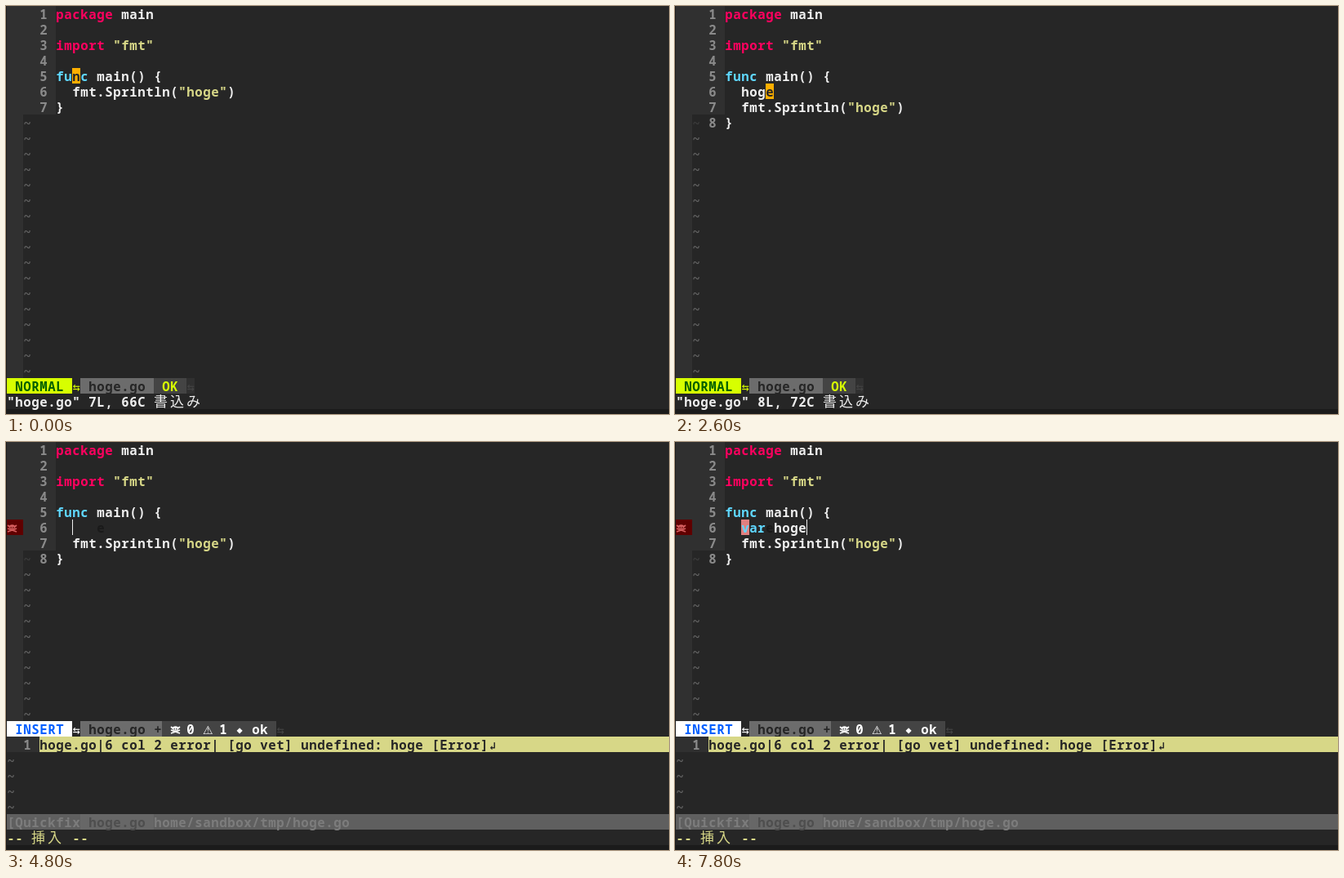
An HTML page with a canvas that plays this animation: 812 px wide and 500 px high, repeating every 8000 ms.

```html
<!DOCTYPE html>
<html lang="ja">
<head>
<meta charset="utf-8">
<title>Editor session</title>
<style>
html, body { margin: 0; height: 100%; overflow: hidden; background: #1b1b1b; }
canvas { display: block; }
</style>
</head>
<body>
<canvas id="screen" width="812" height="500"></canvas>
<script>
const ctx = document.getElementById('screen').getContext('2d');
const LOOP = 8000, CW = 10, RH = 19;
const MONO = '"Noto Sans Mono", "DejaVu Sans Mono", monospace';
const C = {
  bg: '#262626', gutter: '#303030', text: '#eeeeee', num: '#8a8a8a', tilde: '#626262',
  key: '#ff005f', type: '#5fd7ff', str: '#d7d787', cursor: '#ffaf00', lime: '#d7ff00',
  mark: '#e08080', info: '#444444', file: '#6c6c6c'
};

// Symbols: [font, baseline]
const SYMBOLS = {
  '⇆': ['15px "DejaVu Sans Mono", monospace', 16],
  '⚠': ['bold 14px "DejaVu Sans", sans-serif', 16],
  '◆': ['bold 12px "DejaVu Sans Mono", monospace', 15],
  '↲': ['bold 13px "DejaVu Sans Mono", monospace', 16],
  '~': ['600 16px ' + MONO, 17]
};

const px = col => 1 + col * CW;

function fill(col, row, cols, color, rows = 1) {
  ctx.fillStyle = color;
  ctx.fillRect(px(col), row * RH, cols * CW, rows * RH);
}

// Head over crossed bones, with eyes in the background colour
function skull(x, y, color, back) {
  ctx.strokeStyle = ctx.fillStyle = color;
  ctx.lineWidth = 1.7;
  ctx.beginPath();
  for (const side of [-1, 1]) {
    const at = dx => x + 6.5 + side * dx;
    ctx.moveTo(at(5.5), y + 7); ctx.lineTo(at(3), y + 9);
    ctx.moveTo(at(5.5), y + 11); ctx.lineTo(at(-5.5), y + 15);
  }
  ctx.stroke();
  ctx.beginPath();
  ctx.ellipse(x + 6.5, y + 9, 3.6, 2.8, 0, 0, 7);
  ctx.fill();
  ctx.fillStyle = back;
  ctx.fillRect(x + 4.5, y + 9, 1.4, 1.4);
  ctx.fillRect(x + 7.1, y + 9, 1.4, 1.4);
}

// Writes text on the cell grid and returns the next free column
function put(col, row, text, color) {
  const y = row * RH;
  for (const ch of text) {
    const wide = ch > '\u2fff', sym = SYMBOLS[ch], left = wide || ch === '⚠';
    if (ch === '☠') skull(px(col), y, color, C.info);
    else if (ch !== ' ') {
      ctx.fillStyle = color;
      ctx.textAlign = left ? 'left' : 'center';
      ctx.font = wide ? '17px "Noto Sans CJK JP", "Noto Sans CJK", sans-serif'
        : sym ? sym[0] : '600 15.7px ' + MONO;
      ctx.fillText(ch, px(col) + (left ? 0 : CW / 2), y + (sym ? sym[1] : 16));
    }
    col += wide ? 2 : 1;
  }
  return col;
}

const putAll = (row, parts) =>
  parts.reduce((col, [text, color = C.text]) => put(col, row, text, color), 6);

function bar(col, row) {
  ctx.fillStyle = C.text;
  ctx.fillRect(px(col), row * RH, 1, RH);
}

function block(col, row, ch) {
  fill(col, row, 1, C.cursor);
  put(col, row, ch, C.bg);
}

function statusLine(row, insert, modified, info, lime) {
  const accent = lime ? C.lime : '#ffffff';
  const mid = modified ? 19 : 18, end = mid + info.length + 2;
  fill(0, row, 8, accent);
  put(1, row, insert ? 'INSERT' : 'NORMAL', lime ? '#005f00' : '#005fff');
  put(8, row, '⇆', accent);
  fill(9, row, mid - 9, C.file);
  put(10, row, modified ? 'hoge.go +' : 'hoge.go', C.bg);
  fill(mid, row, end - mid, C.info);
  put(mid + 1, row, info, accent);
  if (!modified) fill(end, row, 1, C.gutter);
  put(end, row, '⇆', C.info);
}

function quickfix() {
  fill(0, 19, 4, C.gutter);
  put(2, 19, '1', C.num);
  fill(4, 19, 78, C.str);
  put(4, 19, 'hoge.go|6 col 2 error| [go vet] undefined: hoge [Error]↲', C.bg);
  for (let row = 20; row < 24; row++) put(0, row, '~', C.tilde);
  fill(0, 24, 82, '#5f5f5f');
  fill(9, 24, 9, '#676767');
  put(0, 24, '[Quickfix', '#7c7c7c');
  put(10, 24, 'hoge.go', '#4e4e4e');
  put(18, 24, 'home/sandbox/tmp/hoge.go', '#7c7c7c');
}

// Text of the new line at time t
function typed(t) {
  if (t < 1800) return '';
  if (t < 2000) return 'h';
  if (t < 4600) return 'hoge';
  if (t < 7000) return '';
  if (t < 7200) return 'v';
  if (t < 7400) return 'va';
  if (t < 7600) return 'var ';
  return t < 7800 ? 'var h' : 'var hoge';
}

function newLine(t, insert) {
  const line = typed(t), failed = t >= 2800;
  if (failed) {
    fill(0, 5, 2, '#5f0000');
    skull(px(0), 5 * RH, '#d75f5f', '#5f0000');
    if (line) fill(8, 5, 1, C.mark);
  }
  if (t >= 4600) put(11, 5, 'e', '#1a1a1a');
  const cut = t >= 7600 ? 3 : 0;
  put(put(8, 5, line.slice(0, cut), C.type), 5, line.slice(cut), C.text);
  const blinkOff = (t >= 5400 && t < 5800) || (t >= 6400 && t < 6800);
  if (insert) { if (!blinkOff) bar(8 + line.length, 5); }
  else if (t < 2400 || t >= 2600) block(11, 5, 'e');
}

function message(t, insert) {
  if (insert) put(0, 25, '-- 挿入 --', C.str);
  else if (t < 1400) put(0, 25, '"hoge.go" 7L, 66C 書込み', C.text);
  else if (t >= 2800) put(0, 25, '[go vet] undefined: hoge [Error]', C.text);
  else if (t >= 2600) put(0, 25, '"hoge.go" 8L, 72C 書込み', C.text);
  else if (t >= 2400) bar(put(0, 25, ':w', C.text), 25);
}

function draw(t) {
  const added = t >= 1400, failed = t >= 2800;
  const insert = (added && t < 2200) || t >= 4600;
  const modified = (added && t < 2600) || t >= 4600;
  const statusRow = failed ? 18 : 24, lines = added ? 8 : 7;

  ctx.fillStyle = '#1b1b1b';
  ctx.fillRect(0, 0, 812, 500);
  ctx.fillStyle = C.bg;
  ctx.fillRect(1, 0, 811, 494);
  fill(0, 0, 2, C.gutter, statusRow);
  fill(2, 0, 4, C.gutter, 7);

  for (let i = 0; i < lines; i++) put(4, i, String(i + 1), C.num);
  if (added) put(2, 7, '~', '#3c3c3c');
  for (let row = lines; row < statusRow; row++) put(2, row, '~', C.tilde);

  putAll(0, [['package', C.key], [' main']]);
  putAll(2, [['import ', C.key], ['"fmt"', C.str]]);
  putAll(4, [['func', C.type], [' main() {']]);
  putAll(lines - 2, [['  fmt.Sprintln('], ['"hoge"', C.str], [')']]);
  putAll(lines - 1, [['}']]);
  if (added) newLine(t, insert);
  else block(8, 4, 'n');

  const lime = !insert || (t >= 4600 && t < 4800);
  statusLine(statusRow, insert, modified, failed ? '☠ 0 ⚠ 1 ◆ ok' : 'OK', lime);
  if (failed) quickfix();
  message(t, insert);
}

function tick() {
  draw(performance.now() % LOOP);
  requestAnimationFrame(tick);
}
tick();
</script>
</body>
</html>
```
